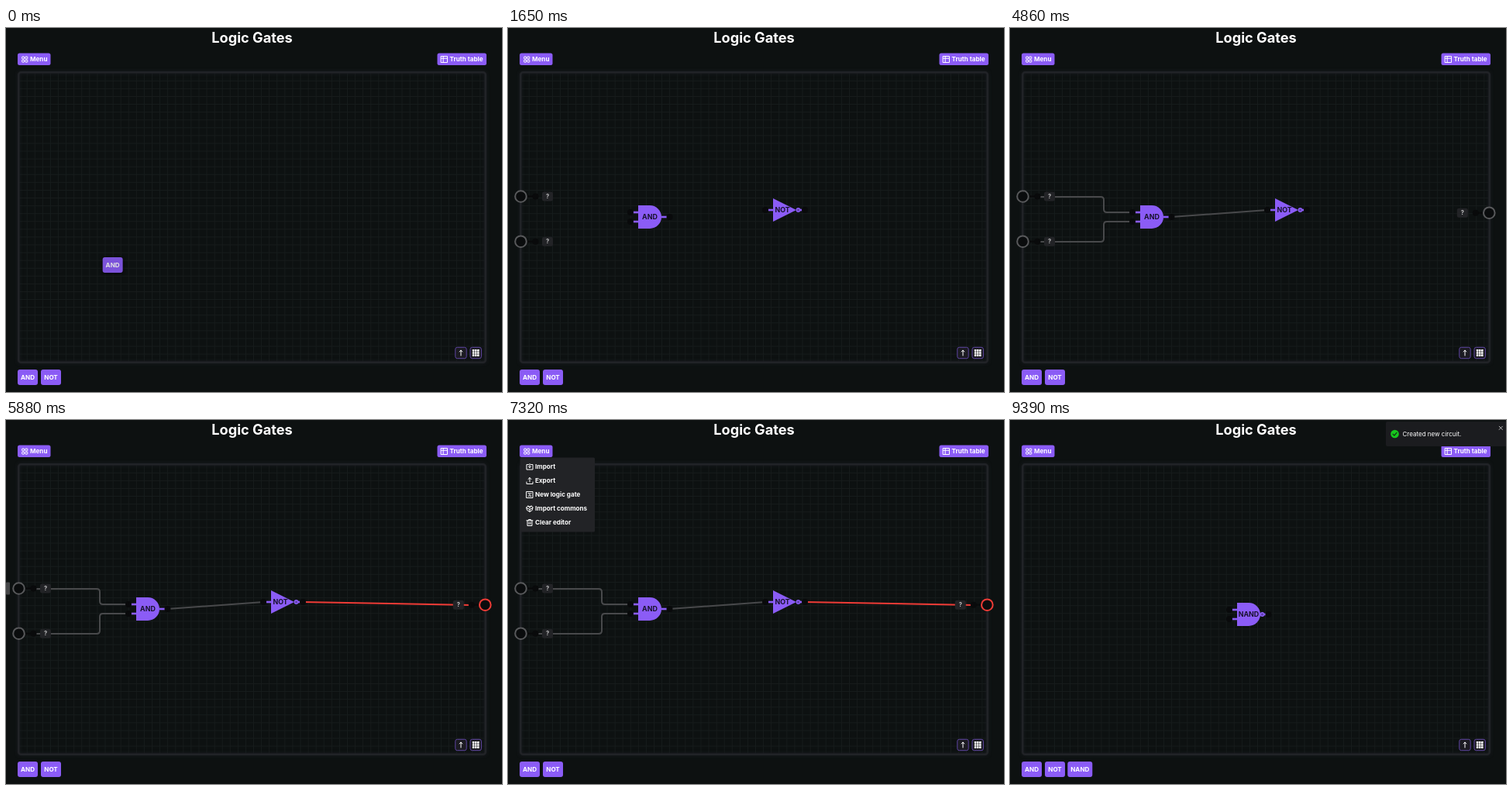
An HTML page for the animation above (9.57 s loop, 640x470 px).

```html
<!DOCTYPE html>
<html lang="en">
<head>
<meta charset="utf-8">
<title>Logic Gates</title>
<style>
  html, body { margin: 0; width: 100%; height: 100%; overflow: hidden; background: #0d1111; }
  svg { display: block; width: 640px; height: 470px; font-family: Inter, sans-serif; }
  .line { fill: none; stroke: #fff; stroke-width: 1; stroke-linecap: round; stroke-linejoin: round; }
  .wire { fill: none; stroke-width: 2; stroke-linejoin: round; }
</style>
</head>
<body>
<svg id="stage" viewBox="0 0 640 470"></svg>
<script>
const LOOP = 9570;
const PURPLE = '#8b5cf6', RED = '#ef3b36', GREY = '#48494b', BG = '#0d1111', PIN = '#090a0b';

// ---- markup helpers ----
const text = (x, y, s, { size = 8.1, weight = 700, fill = '#fff', anchor = 'start' } = {}) =>
  `<text x="${x}" y="${y + size * 0.36}" font-size="${size}" font-weight="${weight}" fill="${fill}" text-anchor="${anchor}">${s}</text>`;
const rect = (x, y, w, h, fill, r = 0, extra = '') =>
  `<rect x="${x}" y="${y}" width="${w}" height="${h}" rx="${r}" fill="${fill}" ${extra}/>`;
const circle = (x, y, r, fill, extra = '') => `<circle cx="${x}" cy="${y}" r="${r}" fill="${fill}" ${extra}/>`;
const line = (d, extra = '') => `<path class="line" d="${d}" ${extra}/>`;
const group = (id, body, extra = '') => `<g id="${id}" ${extra}>${body}</g>`;
const at = (x, y, body) => `<g transform="translate(${x} ${y})">${body}</g>`;

const chipShape = (label, w) =>
  rect(-w / 2, -10, w, 20, PURPLE, 3) + text(0, 0, label, { anchor: 'middle' });
const chip = (id, label, x, w = 26) => group(id, at(x, 451, chipShape(label, w)));
const dragged = (id, label, w = 26) =>
  group(id, chipShape(label, w), 'opacity=".88" style="filter:drop-shadow(0 1px 2px #000)"');

const stub = (x1, x2, y) => `<path d="M${x1} ${y}H${x2}" stroke="${PURPLE}" stroke-width="2.6"/>`;
const pin = (x, y) => circle(x, y, 4, PIN);
const gateLabel = (x, label) => text(x, 0, label, { size: 8.9, fill: '#18122e', anchor: 'middle' });
const bubble = x => circle(x, 0, 2.2, '#5d3fa8', `stroke="${PURPLE}" stroke-width="1.4"`);
const dGate = (id, x, y, label, inverted) => group(id, at(x, y,
  stub(-22, -15, -6) + stub(-22, -15, 6) + stub(15, 22, 0) +
  `<path d="M-15-15H0A15 15 0 0 1 0 15H-15Z" fill="${PURPLE}"/>` + (inverted ? bubble(17.5) : '') +
  gateLabel(0, label) + pin(-25, -6) + pin(-25, 6) + pin(25.5, 0)));
const notGate = (id, x, y) => group(id, at(x, y,
  stub(-19, -13, 0) + stub(19, 25, 0) +
  `<path d="M-13-15V15L17 0Z" fill="${PURPLE}"/>` + bubble(19.5) +
  gateLabel(-1, 'NOT') + pin(-23, 0) + pin(28, 0)));

// dir is 1 for inputs on the left edge, -1 for outputs on the right edge
const port = (id, x, y, dir) => group(id, at(x, y,
  `<path d="M${8 * dir} 0H${19 * dir}" stroke="${PIN}" stroke-width="2.4"/>` +
  circle(0, 0, 7.3, '#0a0c0d', `id="${id}Ring" stroke-width="2"`) +
  pin((dir > 0 ? 19 : 17.5) * dir, 0) +
  rect(34.5 * dir - 7, -6, 14, 12, '#222326', 2.5) +
  text(34.5 * dir, 0, '?', { size: 7.6, weight: 600, fill: '#ddd', anchor: 'middle' })));
const handle = (id, x, y) => rect(x, y - 8, 5, 16, '#454648', 1, `id="${id}"`);

const toolButton = (x, icon) => at(x, 419.5,
  rect(-7.2, -7.2, 14.4, 14.4, '#1c1b22', 2.5, 'stroke="#5d44a0" stroke-width="1"') + icon);
const range = n => [...Array(n).keys()];
const nineDots = range(9).map(i => rect(-4.4 + i % 3 * 3.1, -4.4 + (i / 3 | 0) * 3.1, 2.6, 2.6, '#fff', 0.4)).join('');

const icons = {
  menu: range(4).map(i => rect(-3.5 + i % 2 * 4.2, -3.5 + (i >> 1) * 4.2, 2.9, 2.9, 'none', 0.5, 'stroke="#fff"')).join(''),
  table: line('M-4-4H4V4H-4ZM-4-1.3H4M-1.3-4V4'),
  import: line('M-1.5-3H-4V3.5H4V-3H1.5M0-4V1M-1.6-.5L0 1L1.6-.5'),
  export: line('M-4 1.5V4H4V1.5M0 1.5V-4M-2-2L0-4L2-2'),
  gate: line('M-4-4H4V4H-4ZM-2-1.7H0V1.7H2M-2 1.7H-1M1-1.7H2'),
  commons: line('M-4-2L-2-3.5L0-2.5L2-3.5L4-2L3.2 2L0 4L-3.2 2ZM-4-1L0 1L4-1M0 1V4M-2-3.5L0-1L2-3.5'),
  trash: line('M-4-2.7H4M-3-2.7V4H3V-2.7M-1.4-2.7V-4H1.4V-2.7M-1-.5V2M1-.5V2'),
};
const menuItem = (icon, label, i) =>
  at(28, 60.5 + 18 * i, icons[icon]) + text(35, 60.5 + 18 * i, label);

const gridLines = range(60).map(i => `M${27.2 + i * 10.08} 58V431`).slice(0, 59).join('') +
  range(37).map(i => `M17 ${68.3 + i * 10.08}H618`).join('');

// ---- timeline ----
const wires = [
  [[2010, 36, 218], [2310, 121, 218], [2460, 121, 238], [2610, 121, 238], [2730, 158, 238]],
  [[2880, 36, 276], [3150, 121, 276], [3300, 121, 250], [3510, 158, 250]],
  [[3930, 208, 244], [4380, 332, 235]],
  [[4950, 383, 235], [5460, 601, 239]],
];
const drags = {
  dragAnd: [[0, 137, 307], [210, 183, 244], [270, 183, 244]],
  dragNot: [[630, 58, 451], [870, 355, 235], [900, 355, 235]],
  dragNand: [[8880, 90, 451], [9210, 308, 251], [9360, 308, 251]],
};
const CREATED = 8640;
const typing = [7950, 8130, 8280, 8460];
const visible = {
  andGate: [270, CREATED], notGate: [900, CREATED], nandGate: [9360, LOOP],
  inA: [1230, CREATED], inB: [1530, CREATED], out: [4680, CREATED],
  menu: [7080, 7530], chipNand: [CREATED, LOOP], toast: [CREATED, LOOP],
};
const handles = {
  handleA: [[1110, 1320], [5520, 6030], [6690, 6900]],
  handleB: [[1410, 1620], [6090, 6600]],
  handleOut: [[4560, 4800]],
};
const onA = [[5640, 5880], [5970, 6810]];
const onB = [[6270, 6510]];

// ---- scene ----
const stage = document.getElementById('stage');
stage.innerHTML =
  '<defs><linearGradient id="edge" x2="1" y2="1">' +
  '<stop offset="0" stop-color="#6d35e8"/><stop offset=".45" stop-color="#5a3fa5"/><stop offset="1" stop-color="#55585a"/>' +
  '</linearGradient></defs>' +
  group('scene',
    rect(-20, -20, 680, 510, BG) +
    text(317.5, 12, 'Logic Gates', { size: 18.2, anchor: 'middle' }) +
    rect(15, 32.5, 42.5, 15.5, PURPLE, 2.5) + at(24.2, 40.5, icons.menu) + text(31, 40.5, 'Menu') +
    rect(556.5, 32.5, 63.5, 15.5, PURPLE, 2.5) + at(565.5, 40.5, icons.table) + text(572.5, 40.5, 'Truth table') +
    `<path d="${gridLines}" stroke="#171c1c" stroke-width="1"/>` +
    rect(16.3, 57.3, 602.4, 374.4, 'none', 3, 'stroke="#212327" stroke-width="2.6" style="filter:drop-shadow(0 0 2px #1c1e24)"') +
    toolButton(587, line('M0 3.5V-3.3M-1.8-1.5L0-3.5L1.8-1.5', 'stroke-width="1.3"')) +
    toolButton(606.2, nineDots) +
    chip('chipAnd', 'AND', 28) + chip('chipNot', 'NOT', 58) + chip('chipNand', 'NAND', 90.3, 32) +
    group('hint',
      text(19, 66.5, 'Press', { size: 8, weight: 500 }) +
      rect(43, 60.5, 33, 12.5, '#222326', 2) + text(59.5, 66.5, 'Escape', { size: 8, weight: 600, anchor: 'middle' }) +
      text(78, 66.5, 'to stop wiring', { size: 8, weight: 500 })) +
    wires.map((_, i) => `<path class="wire" id="wire${i}"/>`).join('') +
    port('inA', 16.5, 217.5, 1) + port('inB', 16.5, 275.7, 1) + port('out', 618.3, 238.7, -1) +
    handle('handleA', 0, 217.5) + handle('handleB', 0, 275.7) + handle('handleOut', 630, 238.7) +
    dGate('andGate', 183, 244, 'AND') + notGate('notGate', 355, 235) + dGate('nandGate', 308, 251, 'NAND', true) +
    dragged('dragAnd', 'AND') + dragged('dragNot', 'NOT') + dragged('dragNand', 'NAND', 32) +
    group('menu',
      rect(15.5, 48.5, 96.5, 96, '#222326', 1.5) +
      menuItem('import', 'Import', 0) + menuItem('export', 'Export', 1) +
      menuItem('gate', 'New logic gate', 2) + menuItem('commons', 'Import commons', 3) +
      menuItem('trash', 'Clear editor', 4))) +
  group('modal',
    rect(0, 0, 640, 470, 'rgba(0,0,0,.2)') +
    rect(237.2, 202.5, 160.6, 114.5, BG, 2.5, 'stroke="url(#edge)" stroke-width="1.2"') +
    text(245.5, 217.3, 'Create logic gate', { size: 9.1 }) +
    text(245.5, 229.3, 'Convert your current logic into a logic gate', { size: 7, weight: 400, fill: '#8d9092' }) +
    text(245.5, 239.3, 'that you can re-use within this project.', { size: 7, weight: 400, fill: '#8d9092' }) +
    text(245.5, 254.7, 'Name') +
    rect(245.8, 261.3, 103.6, 16.8, BG, 2.5, 'stroke="#55585a" stroke-width="1"') +
    '<text id="field" x="250.5" y="272.8" font-size="8" fill="#fff"></text>' +
    rect(0, 265, 0.8, 9.5, '#fff', 0, 'id="caret"') +
    rect(342.5, 292.8, 47.5, 16.2, PURPLE, 2.5) + at(351.5, 300.9, icons.gate) + text(359, 300.9, 'Create')) +
  group('toast',
    rect(485, 2, 158, 32, '#1b1c1f', 2) +
    circle(496.5, 18, 5.3, '#17c81e') + line('M494 18.2L495.8 20L499 16.3', 'style="stroke:#123014;stroke-width:1.2"') +
    text(506.5, 18, 'Created new circuit.', { size: 8, weight: 400 }) +
    line('M631.2 8.2L635.4 12.4M635.4 8.2L631.2 12.4', 'style="stroke:#bbb"'));

// ---- motion ----
const $ = Object.fromEntries([...stage.querySelectorAll('[id]')].map(e => [e.id, e]));
const show = (el, on) => { el.style.display = on ? '' : 'none'; };
const within = (t, [a, b]) => t >= a && t < b;
const any = (t, spans) => spans.some(s => within(t, s));
const clamp = v => Math.min(1, Math.max(0, v));
const ease = k => k * k * (3 - 2 * k);
const easeOut = k => 1 - (1 - k) ** 3;

// Points already passed, followed by the current position.
function trail(keys, t, curve) {
  const points = [keys[0].slice(1)];
  for (let i = 1; i < keys.length; i++) {
    const [t0, x0, y0] = keys[i - 1], [t1, x1, y1] = keys[i];
    if (t <= t0) break;
    const k = curve(clamp((t - t0) / (t1 - t0)));
    if (x0 !== x1 || y0 !== y1) points.push([x0 + (x1 - x0) * k, y0 + (y1 - y0) * k]);
  }
  return points;
}

function roundedPath(points, radius = 4) {
  const toward = ([x, y], [u, v]) => {
    const d = Math.hypot(u - x, v - y) || 1, k = Math.min(radius, d / 2) / d;
    return [x + (u - x) * k, y + (v - y) * k];
  };
  return 'M' + points.map((p, i) => i === 0 || i === points.length - 1
    ? p : `${toward(p, points[i - 1])}Q${p} ${toward(p, points[i + 1])}`).join('L');
}

function render(t) {
  for (const id in visible) show($[id], within(t, visible[id]));
  for (const id in handles) show($[id], any(t, handles[id]));

  for (const id in drags) {
    const keys = drags[id];
    show($[id], within(t, [keys[0][0], keys.at(-1)[0]]));
    const [x, y] = trail(keys, t, id === 'dragAnd' ? easeOut : ease).at(-1);
    $[id].setAttribute('transform', `translate(${x} ${y})`);
  }

  const a = any(t, onA), b = any(t, onB), result = !(a && b);
  const connected = t >= wires[3].at(-1)[0];
  const live = [a, b, a && b, connected && result];
  wires.forEach((keys, i) => {
    const el = $['wire' + i];
    show(el, within(t, [keys[0][0], CREATED]));
    el.setAttribute('d', roundedPath(trail(keys, t, ease)));
    el.setAttribute('stroke', live[i] ? RED : GREY);
  });
  [['inA', a], ['inB', b], ['out', live[3]]].forEach(([id, on]) =>
    $[id + 'Ring'].setAttribute('stroke', on ? RED : '#58595b'));
  show($.hint, wires.some(keys => within(t, [keys[0][0], keys.at(-1)[0]])));

  const open = t < CREATED ? clamp((t - 7560) / 120) : 0;
  show($.modal, open > 0);
  $.modal.style.opacity = open;
  $.scene.style.filter = open ? `blur(${1.6 * open}px)` : '';
  $.field.textContent = 'NAND'.slice(0, typing.filter(k => t >= k).length);
  if (open) $.caret.setAttribute('x', 250.7 + $.field.getComputedTextLength());

  const slide = easeOut(clamp((t - CREATED) / 240));
  $.toast.setAttribute('transform', `translate(${160 * (1 - slide)} 0)`);
}

const start = performance.now();
function tick() {
  render((performance.now() - start) % LOOP);
  requestAnimationFrame(tick);
}
tick();
</script>
</body>
</html>
```
